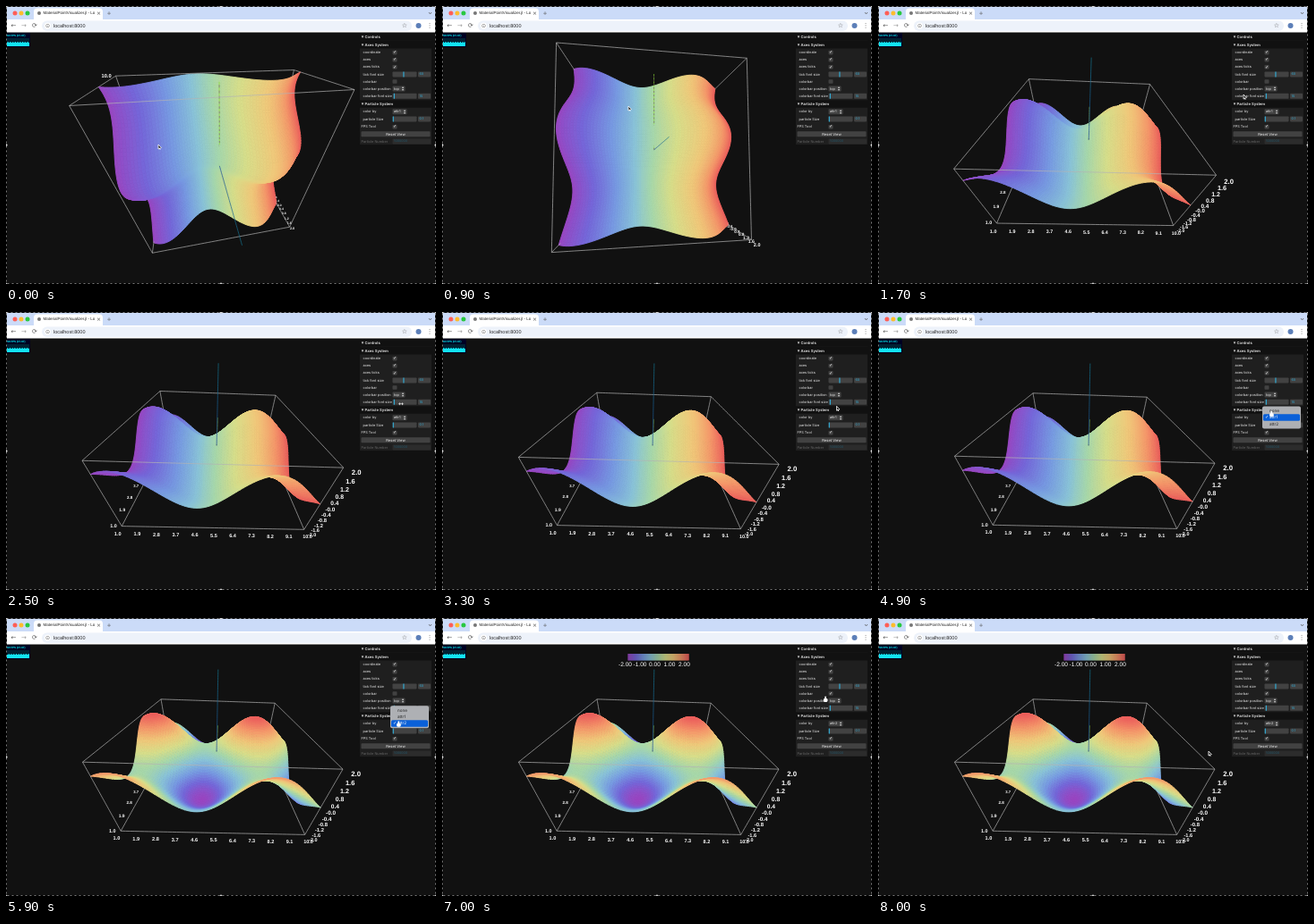
An HTML page with a canvas for the animation above (8.1 s loop, 480 by 311 pixels).

```html
<!DOCTYPE html>
<html lang="en">
<head>
<meta charset="utf-8">
<title>MaterialPointVisualizer.jl</title>
<style>
html, body { margin: 0; width: 100%; height: 100%; overflow: hidden; background: #111; }
canvas { display: block; width: 480px; height: 311px; }
</style>
</head>
<body>
<canvas id="stage"></canvas>
<script>
const W = 480, H = 311, LOOP = 8100, STEP = 100;
const FOCAL = 183.1, CX = 240, CY = 169.8;
const SANS = '"Liberation Sans", Arial, sans-serif';
const UI = 'Inter, Roboto, sans-serif';
const ICON = '"DejaVu Sans", sans-serif';
const canvas = document.getElementById('stage');
const g = canvas.getContext('2d');
const ratio = window.devicePixelRatio || 1;
canvas.width = W * ratio;
canvas.height = H * ratio;
g.textRendering = 'geometricPrecision';

// time, x, y
const POINTER = [
  [0, 170, 156], [900, 208, 113], [1700, 408, 100], [2500, 441, 103],
  [4200, 440, 110], [6200, 438, 119], [6900, 434, 84], [8000, 369, 150]
];
const RAINBOW = ['#9a46c2', '#7468da', '#789ce2', '#8ac4d8', '#a8d8aa', '#d8de8a', '#f0c87a', '#f4986a', '#ec5e5c']
  .map(hex => [1, 3, 5].map(i => parseInt(hex.slice(i, i + 2), 16)));

const mix = (a, b, f) => a.map((v, i) => v + (b[i] - v) * f);

function at(keys, t) {
  const i = keys.findIndex(k => k[0] > t);
  if (i < 0) return keys[keys.length - 1].slice(1);
  const a = keys[i - 1], b = keys[i];
  return mix(a, b, (t - a[0]) / (b[0] - a[0])).slice(1);
}

function color(v) {
  const n = RAINBOW.length - 1, s = Math.max(0, Math.min(1, v)) * n;
  const i = Math.min(n - 1, Math.floor(s));
  return `rgb(${mix(RAINBOW[i], RAINBOW[i + 1], s - i).map(Math.round)})`;
}

function box(x, y, w, h, fill, r = 0) {
  g.fillStyle = fill;
  g.beginPath();
  g.roundRect(x, y, w, h, r);
  g.fill();
}

const disc = (x, y, r, fill) => box(x - r, y - r, 2 * r, 2 * r, fill, r);

function path(points, stroke, width, fill) {
  g.beginPath();
  points.forEach(p => g.lineTo(p[0], p[1]));
  if (fill) {
    g.closePath();
    g.fillStyle = fill;
    g.fill();
  }
  g.strokeStyle = stroke;
  g.lineWidth = width;
  g.stroke();
}

function text(s, x, y, size, fill, align = 'left', weight = 400, family = UI) {
  g.font = `${weight} ${size}px ${family}`;
  g.fillStyle = fill;
  g.textAlign = align;
  g.textBaseline = 'middle';
  g.fillText(s, x, y);
}

const icon = (s, x, y, size, fill = '#555') => text(s, x, y, size, fill, 'center', 400, ICON);

// Dragging speeds up, then the release coasts to rest; result in degrees.
function tilt(t) {
  const s = t / 1000;
  return s < 1.3 ? -37.2 + 10 * s + 37.7 * s * s : 54 - 14.4 * Math.exp(-1.73 * (s - 1.3));
}

// Returns a function from data coordinates to [screen x, screen y, depth].
function camera(t) {
  const angle = tilt(t), q = angle * Math.PI / 180;
  const left = (54 - angle) / 91.2;
  const xy = .027 - .138 * left ** 3, xz = .018 + .132 * Math.sin(left * Math.PI / 2);
  const centre = [-.282 + .2 * left, -1.17 + 1.65 * left ** 1.5, 9.413 + 1.077 * Math.max(0, 1 - left) ** 2.7];

  const X = [Math.sqrt(1 - xy * xy - xz * xz), xy, xz];
  const up = [0, -Math.cos(q), Math.sin(q)];
  const dot = up[1] * xy + up[2] * xz;
  const flat = up.map((v, i) => v - dot * X[i]);
  const Y = flat.map(v => v / Math.hypot(...flat));
  const Z = [X[1] * Y[2] - X[2] * Y[1], X[2] * Y[0] - X[0] * Y[2], X[0] * Y[1] - X[1] * Y[0]];
  return (x, y, z) => {
    const [u, v, d] = centre.map((c, i) => c + (x - 5.5) * X[i] + (y - 5.5) * Y[i] + z * Z[i]);
    return [CX + FOCAL * u / d, CY + FOCAL * v / d, d];
  };
}

// Everything in the scene is painted from far to near.
function drawScene(t, byHeight) {
  const project = camera(t), items = [];
  const add = (d, draw) => items.push({ d, draw });
  const height = (x, y) => Math.sin(x) + Math.cos(y);

  const N = 72, cell = 9 / N;
  const point = (i, j) => {
    const x = 1 + i * cell, y = 1 + j * cell;
    return project(x, y, height(x, y));
  };
  for (let i = 0; i < N; i++) for (let j = 0; j < N; j++) {
    const quad = [point(i, j), point(i + 1, j), point(i + 1, j + 1), point(i, j + 1)];
    const z = height(1 + (i + .5) * cell, 1 + (j + .5) * cell);
    const c = color(byHeight ? (z + 2) / 4 : (i + .5) / N);
    add((quad[0][2] + quad[2][2]) / 2, () => path(quad, c, .9, c));
  }

  const line = (a, b, paint) => {
    const n = 40;
    for (let i = 0; i < n; i++) {
      const p = project(...mix(a, b, i / n)), q = project(...mix(a, b, (i + 1) / n));
      add((p[2] + q[2]) / 2 - .1, () => path([p, q], paint(i / n, i), .7));
    }
  };
  const white = () => '#b4b4b4';
  for (const a of [1, 10]) for (const b of [-2, 2]) {
    line([1, a, b], [10, a, b], white);
    line([a, 1, b], [a, 10, b], white);
  }
  for (const a of [1, 10]) for (const b of [1, 10]) line([a, b, -2], [a, b, 2], white);

  const mid = [5.5, 5.5, 0];
  line(mid, [5.5, 10, 0], (f, i) => i % 2 ? '#8d3' : '#6a6a48');
  line(mid, [5.5, 5.5, 4.5], f => `rgb(${30 - 10 * f},${70 + 45 * f},${150 - 10 * f})`);

  const label = (s, x, y, z) => {
    const p = project(x, y, z);
    add(p[2] - .1, () => text(s, p[0], p[1], 43 / p[2], '#fff', 'center', 700, SANS));
  };
  for (let i = 0; i <= 10; i++) {
    const v = 1 + .9 * i, z = -2 + .4 * i;
    label(v.toFixed(1), v, .6, -2);
    label(v.toFixed(1), .6, v, -2);
    label(i === 5 ? '-0.0' : z.toFixed(1), 10.28, .72, z);
  }

  items.sort((a, b) => b.d - a.d).forEach(item => item.draw());
}

function drawBrowser() {
  box(0, 0, W, 16, '#cbdbf8');
  ['#ff5f57', '#febc2e', '#28c840'].forEach((c, i) => disc(10 + 7 * i, 8, 2.5, c));
  box(31, 2.5, 77, 16, '#fff', 4);
  box(0, 15, W, 14.5, '#fff');
  disc(37, 8, 2, '#777');
  text('MaterialPointVisualizer.jl - Lo', 41.5, 8.2, 4.5, '#222', 'left', 400, SANS);
  icon('×', 103.5, 8, 6);
  icon('+', 115, 8, 6);
  path([[472, 7], [473.5, 9], [475, 7]], '#555', .7);
  icon('←', 8.5, 22, 7);
  icon('→', 20, 22, 7, '#999');
  icon('⟳', 32, 22, 7);
  box(40, 16.5, 413, 11.5, '#edf2fa', 5.7);
  disc(46.5, 22.2, 3.4, '#fff');
  icon('⊙', 46.5, 22.2, 6);
  text('localhost:8000', 53, 22.4, 5.5, '#222', 'left', 400, SANS);
  icon('☆', 445, 22, 7);
  disc(460.5, 22, 3, '#5c7fb8');
  icon('⋮', 473, 22, 7);
}

function drawStats(t) {
  box(0, 30, 27, 16, '#002');
  text(`${60 - Math.floor(t / 900) % 3} FPS (37-67)`, 1, 33, 3, '#0ff', 'left', 700, SANS);
  box(1, 36, 25, 9, '#023');
  for (let i = 0; i < 25; i++) {
    const h = 4.4 + .5 * Math.sin(2.3 * (i + t / 100));
    box(1 + i, 45 - h, 1.05, h, '#12e4f4');
  }
}

const field = (x, y, w, fill = '#424242') => box(x, y - 3, w, 6, fill, .8);

// One drawing rule for each kind of panel control.
const CONTROL = {
  check(y, on) {
    box(431.5, y - 2.3, 5, 4.6, '#424242', .8);
    if (on) icon('✓', 434, y, 5, '#fff');
  },
  slider(y, [f, value]) {
    field(431.5, y, 27);
    box(431.8 + 26 * f, y - 3, .9, 6, '#2cc9ff');
    field(460, y, 14);
    text(value, 461.5, y, 3.6, '#2cb4e4');
  },
  select(y, value) {
    const w = value.length > 3 ? 16 : 14;
    field(431.5, y, w);
    text(value, 433, y, 3.8, '#ebebeb');
    icon('▴', 429 + w, y - 1.2, 4, '#ddd');
    icon('▾', 429 + w, y + 1.2, 4, '#ddd');
  },
  button(y, name) {
    field(396.5, y, 77);
    text(name, 435, y, 4.1, '#ebebeb', 'center');
  },
  number(y, value) {
    field(431.5, y, 42.5, '#2c2c2c');
    text(value, 433, y, 3.6, '#205a70');
  }
};

function drawPanel(attr, bar) {
  box(395, 30.5, 80, 124.5, '#1f1f1f');
  // level (0 title, 1 folder row, 2 loose row), name, control, value
  const rows = [
    [0, 'Controls'],
    [0, 'Axes System'],
    [1, 'coordinate', 'check', true],
    [1, 'axes', 'check', true],
    [1, 'axes ticks', 'check', true],
    [1, 'tick font size', 'slider', [.45, '60']],
    [1, 'colorbar', 'check', bar],
    [1, 'colorbar position', 'select', 'top'],
    [1, 'colorbar font size', 'slider', [.04, '15']],
    [0, 'Particle System'],
    [1, 'color by', 'select', attr],
    [1, 'particle Size', 'slider', [0, '0.1']],
    [2, 'FPS Tool', 'check', true],
    [2, '', 'button', 'Reset View'],
    [2, 'Particle Number', 'number', '1000000']
  ];
  let y = 25.7, last = 0;
  for (const [level, name, kind, value] of rows) {
    y += level && level === last ? 8.1 : 8.8;
    last = level;
    if (kind) {
      text(name, level === 1 ? 398.5 : 396.5, y, 3.9, kind === 'number' ? '#666' : '#ebebeb');
      CONTROL[kind](y, value);
    } else {
      box(395, y - 4.2, 80, 8.4, '#111');
      icon('▾', 398, y, 5, '#ddd');
      text(name, 400.5, y, 4.2, '#ebebeb', 'left', 600);
    }
  }
}

// The list opens with the current entry over its control.
function drawMenu(current) {
  const top = 118 - 7.4 * current;
  box(429, top - 5, 43, 25, '#aeb0b4', 2);
  ['none', 'attr1', 'attr2'].forEach((s, i) => {
    const y = top + 7.4 * i, on = i === current;
    if (on) {
      box(430, y - 3.8, 41, 7.6, '#0a60d8', 1.5);
      icon('✓', 434, y, 5, '#fff');
    }
    text(s, 437, y, 4.6, on ? '#fff' : '#222');
  });
}

function drawColorbar() {
  for (let i = 0; i < 68; i++) box(207.5 + i, 40, 1.1, 7.5, color(i / 67));
  for (let i = -2; i <= 2; i++) text(i.toFixed(2), 237.5 + 16.5 * i, 52.3, 6.6, '#fff', 'center', 400, SANS);
}

function drawPointer(t) {
  const [x, y] = at(POINTER, t);
  if (t >= 2200 && t < 3300) {
    icon('↔', x, y, 7, '#fff');
  } else if (t >= 3600 && t < 7300) {
    box(x - .8, y - 2.5, 1.6, 4, '#fff', .8);
    box(x - 2.2, y, 4.6, 4, '#fff', 1.4);
  } else {
    path([[x, y - 1], [x, y + 4], [x + 3.4, y + 2.6], [x, y - 1]], '#fff', .8, '#111');
    path([[x + 1, y + 2.5], [x + 2.2, y + 4.8]], '#fff', .8);
  }
}

function drawFrame() {
  g.lineWidth = 1;
  g.strokeStyle = '#000';
  g.strokeRect(.5, .5, W - 1, H - 1);
  g.setLineDash([2, 3]);
  g.strokeStyle = '#777';
  g.strokeRect(.5, .5, W - 1, H - 1);
  g.setLineDash([]);
  for (const x of [0, W / 2, W]) for (const y of [0, H / 2, H]) {
    if (x !== W / 2 || y !== H / 2) disc(x, y, 1.6, '#ccc');
  }
}

function draw(t) {
  g.setTransform(ratio, 0, 0, ratio, 0, 0);
  box(0, 0, W, H, '#111');
  const byHeight = t >= 5300, bar = t >= 7000;
  drawScene(t, byHeight);
  if (bar) drawColorbar();
  drawBrowser();
  drawStats(t);
  drawPanel(byHeight ? 'attr2' : 'attr1', bar);
  if (t >= 4600 && t < 5300) drawMenu(1);
  if (t >= 5700 && t < 6200) drawMenu(2);
  drawPointer(t);
  drawFrame();
}

let shown = -1;
function tick() {
  const t = Math.floor(performance.now() % LOOP / STEP) * STEP;
  if (t !== shown) draw(shown = t);
  requestAnimationFrame(tick);
}
tick();
</script>
</body>
</html>
```
